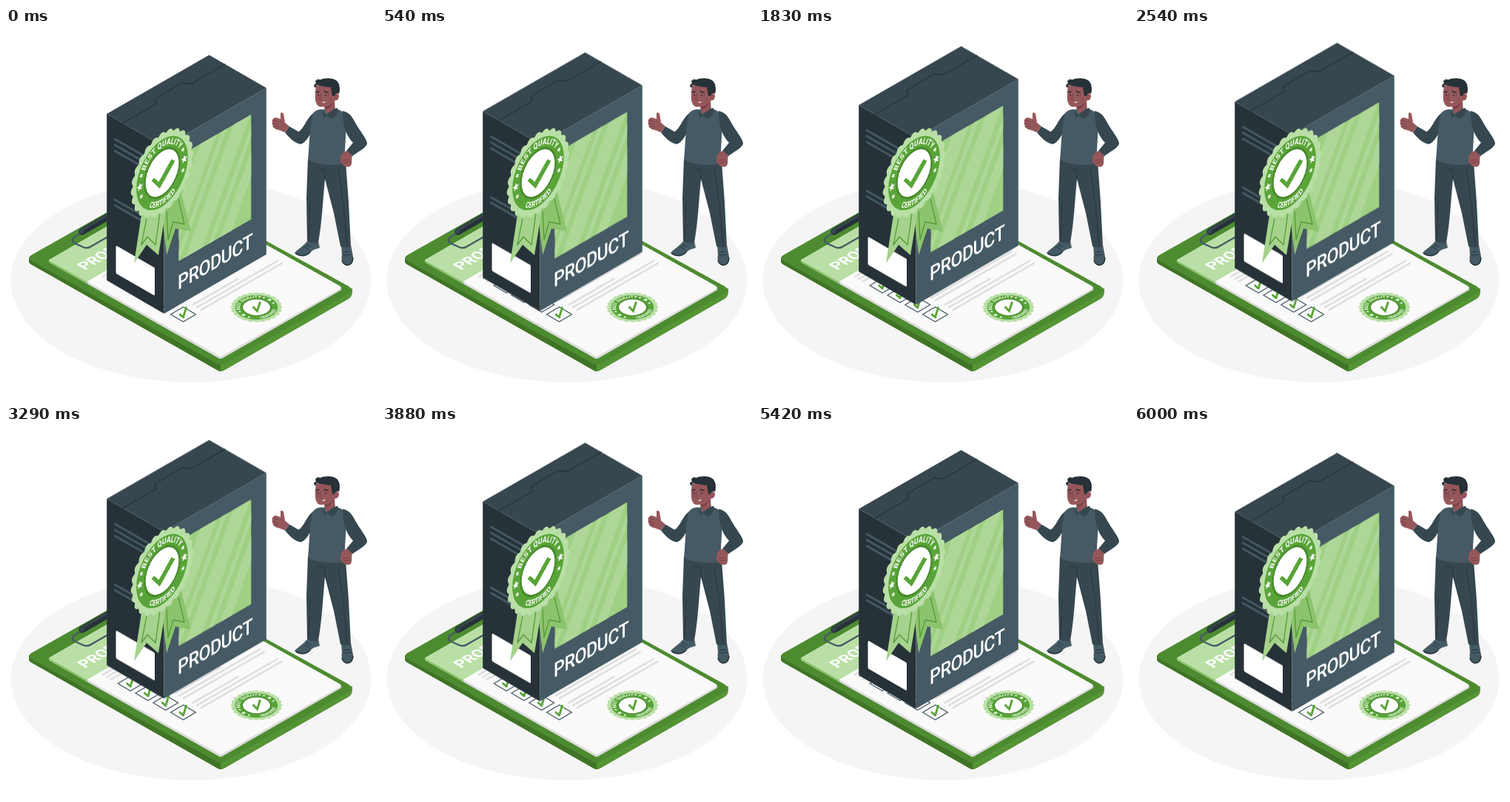
Recreate the animation shown at these times as an HTML page. Size 500 by 500 pixels, loop 6040 ms.

```html
<!DOCTYPE html>
<html lang="en">
<head>
<meta charset="utf-8">
<title>Certified product</title>
<style>
  html, body { margin: 0; width: 100%; height: 100%; overflow: hidden; background: #fff; }
  svg { display: block; width: 100vw; height: 100vh; }
  text { fill: #fff; font-family: Roboto, Inter, sans-serif; }
  .line { fill: none; stroke-linecap: round; stroke-linejoin: round; }
  .tick { fill: none; stroke: #59a438; }
  .skin { fill: #96575b; }
  .dark { fill: #37474f; }
  .slate { fill: #455a64; }
  .ink { fill: #263238; }
</style>
</head>
<body>
<svg viewBox="0 0 500 500">
  <defs>
    <path id="arcTop" d="M-31.5 0A31.5 31.5 0 0 1 31.5 0"/>
    <path id="arcLow" d="M-38 0A38 38 0 0 0 38 0"/>
    <path id="star" d="M0 -4L1.2 -1.5L4 -1.2L1.9 .6L2.5 3.4L0 2L-2.5 3.4L-1.9 .6L-4 -1.2L-1.2 -1.5Z" fill="#fff"/>
    <clipPath id="pane"><rect x="23" y="-200.5" width="113" height="141.5"/></clipPath>
    <g id="badge">
      <path id="scallop" fill="#b9dfa6"/>
      <circle r="40.500" fill="#59a438"/>
      <circle r="28.500" fill="#478a2c"/>
      <circle r="26" fill="#fff"/>
      <g id="stars"></g>
      <g font-weight="700" text-anchor="middle">
        <text font-size="9.8"><textPath href="#arcTop" startOffset="50%">BEST QUALITY</textPath></text>
        <text font-size="9.2"><textPath href="#arcLow" startOffset="50%">CERTIFIED</textPath></text>
      </g>
    </g>
  </defs>

  <ellipse cx="250" cy="341.500" rx="243.5" ry="137.500" fill="#f5f5f5"/>

  <!-- clipboard -->
  <path d="M31 310V315Q31 318 35 320L285 462Q290 466 296 462L463 366Q468 363 468 356V352Z" fill="#559535"/>
  <path d="M31 311V315Q31 318 35 320L285 462Q288 464 290 464V450Z" fill="#3f7426"/>
  <path d="M34 307L202 212Q208 208 214 212L463 349Q470 354 463 359L296 453Q290 457 284 453L35 315Q28 311 34 307Z" fill="#4d8b30"/>
  <path d="M58 313.500V316.500L287 446Q290 448 293 446L453 354V350.500Z" fill="#dcdcdc"/>
  <path d="M58 313.500V316.500L110 346V342Z" fill="#8cc46e"/>
  <path d="M58 313.500L221 219.500L451 348.500Q454 350.500 451 352.500L292 443Q290 444.500 288 443Z" fill="#fafafa"/>
  <path d="M58 313.500L221 219.500L273 248.500L110 342.500Z" fill="#b9dfa6"/>
  <text transform="matrix(.866 -.5 .866 .5 107 327.500)" font-size="20.500" font-weight="700">PRODUCT</text>
  <g class="line">
    <path d="M102 277L92 283Q87 287 93 291L104 296Q110 299 117 294L150 275" stroke="#455a64" stroke-width="2.200"/>
    <path d="M103 275L150 248" stroke="#263238" stroke-width="9.500"/>
    <path d="M104 272L150 245.500" stroke="#37474f" stroke-width="3"/>
    <circle cx="102.500" cy="275" r="3" class="dark"/>
  </g>
  <g id="rows" class="line"></g>
  <use href="#badge" transform="matrix(.502 -.29 .502 .29 338.500 377.500)"/>
  <path class="tick" d="M333.500 376.500L339.500 382.500L343.500 370" stroke-width="3"/>

  <!-- man -->
  <g>
    <path class="slate" d="M408 287C402 295 394 299 391 303C390 307 398 309 404 308C410 306 413 300 418 299L424 297L422 288Z"/>
    <path class="slate" d="M453 293L454 306C452 313 456 320 461 321C467 321 470 316 469 309L466 293Z"/>
    <path class="line" d="M391 304C397 309 405 309 411 303M454 314C457 323 468 323 469 311" stroke="#263238" stroke-width="1.400"/>
    <path class="line" d="M403 296l6 3M406 293l6 3M456 303l9-1M456 307l10-1" stroke="#263238" stroke-width=".8"/>
    <path class="dark" d="M408 176L406 230L407 288Q414 292 422 290C427 263 428 235 431 204L443 250L452 295Q459 298 466 295L463 235L459 181Z"/>
    <path class="line" d="M431 205L430 191M420 188Q425 191 430 191M411 232L409 286M449 190L456 240L461 293" stroke="#263238" stroke-width=".8"/>
    <path class="dark" d="M424 112C412 113 408 124 402 133C399 137 397 140 395 140L383 133L377 141C383 149 391 156 398 157C404 156 409 147 414 139Z"/>
    <path class="skin" d="M371 115C373 113 376 116 375.500 119L377 128L383 133L377 141L369 138C363 137 360 134 360 129C359 124 361 121 365 121L371 123Z"/>
    <path class="line" d="M361 125l7 1M360 129l8 1M362 133l6 1" stroke="#703d42" stroke-width=".8"/>
    <path class="slate" d="M424 110L448 110C456 112 459 116 460 130L457 183C443 187 420 185 408 178C410 160 410 135 414 118C416 112 420 111 424 110Z"/>
    <path class="dark" d="M455 112C464 114 468 120 472 128C478 139 488 150 488 156C487 162 476 167 468 173L460 166L469 155C462 147 455 137 455 112Z"/>
    <path class="skin" d="M461 166L468 173C466 178 469 183 465 187C460 189 454 186 452 180C451 174 454 167 461 166Z"/>
    <path class="line" d="M455 179l8-1M456 183l8-2" stroke="#703d42" stroke-width=".8"/>
    <path class="skin" d="M430 99L444 96L445 114L433 119Z"/>
    <path d="M430 106Q438 106 442 100Q440 109 431 111Z" fill="#7c464b"/>
    <path class="dark" d="M427 112L432 117L444 109L448 108C450 113 446 119 441 123L434 118L430 122Z"/>
    <path class="skin" d="M419 78C417 92 417 103 423 106C430 108 438 104 442 98Q450 99 450 92Q449 87 444 88L440 74Z"/>
    <path class="ink" d="M418 81C415 78 416 76 419 75L418 72Q420 68 425 70C430 67 446 67 449 74C452 79 451 86 450 89Q446 86 444 92L441 92L439 80C433 80 425 78 420 77Z"/>
    <path class="line" d="M419 87l4-1M430 86l5 1" stroke="#263238" stroke-width="1.300"/>
    <circle class="ink" cx="422" cy="90.500" r="1"/><circle class="ink" cx="432" cy="91" r="1"/>
    <path class="line" d="M426 89L423.500 96L426 97" stroke="#703d42" stroke-width=".9"/>
    <path d="M427 100Q430 100.500 432 98.500Q430 103 427 100Z" fill="#fff"/>
  </g>

  <!-- box -->
  <g id="box">
    <path class="ink" d="M136.200 116L213.500 160.500V386L136.200 341Z"/>
    <path class="slate" d="M213.500 160.500L351.800 81V306L213.500 386Z"/>
    <path class="dark" d="M274.500 36.500L351.800 81L213.500 160.500L136.200 116Z"/>
    <path class="line" d="M158 128.500L203 102.500L201 96L238 74L250 75.500L296 49" stroke="#263238" stroke-width="1.300"/>
    <path class="line" d="M147 150l60 34.500M147 158l60 34.500M147 166l60 34.500M147 232l44 25M147 239.500l44 25" stroke="#455a64" stroke-width="2.600"/>
    <path d="M150 294.500L200 323.500Q201 324 201 325.500V360Q201 362 199.500 361L150 332.500Q148.500 331.500 148.500 330V296Q148.500 294 150 294.500Z" fill="#fff"/>
    <g transform="matrix(.866 -.5 0 1 213.500 385.500)">
      <g id="glass" clip-path="url(#pane)">
        <rect x="23" y="-201" width="114" height="143" fill="#9fd084"/>
      </g>
      <text x="21.500" y="-20.500" font-size="27" font-weight="500" letter-spacing="-.7">PRODUCT</text>
    </g>
  </g>

  <!-- rosette -->
  <path d="M210 245L217 307L229 271L250 275L237 223Z" fill="#8cc46e"/>
  <path d="M184 246L173 318L190 293L206 307L216 246Z" fill="#a5d28c"/>
  <path class="line" d="M191 252L183 293L191 282L202 293L208 250M217 248L219 286L226 262L241 265L233 231" stroke="#559a36" stroke-width="1.300"/>
  <use href="#badge" transform="matrix(.86 -.54 0 1.115 211 196)"/>
  <path class="tick" d="M198.500 204.500L207 212.500L226 178.500" stroke-width="5.600"/>
</svg>
<script>
  const $ = id => document.getElementById(id);

  function add(parent, tag, attrs) {
    const el = document.createElementNS("http://www.w3.org/2000/svg", tag);
    for (const key in attrs) el.setAttribute(key, attrs[key]);
    parent.append(el);
  }

  // Scalloped rim of the rosette
  const rim = Array.from({ length: 264 }, (_, i) => {
    const a = i / 264 * Math.PI * 2;
    const r = 46 + 3.2 * Math.abs(Math.cos(12 * a));
    return `${(r * Math.cos(a)).toFixed(2)} ${(r * Math.sin(a)).toFixed(2)}`;
  });
  $("scallop").setAttribute("d", `M${rim.join("L")}Z`);

  for (const side of [0, 180])
    for (const turn of [-21, 0, 21])
      add($("stars"), "use", {
        href: "#star",
        transform: `rotate(${side + turn}) translate(35 0) rotate(${-side - turn}) scale(${turn ? 0.75 : 1.2})`
      });

  // Document rows: a tick box and three lines of text each
  const rows = $("rows");
  const rule = (x, y, w) =>
    add(rows, "path", { d: `M${x} ${y}l${w} ${-w * 0.577}`, stroke: "#e0e0e0", "stroke-width": 2.6 });
  for (let i = 0; i < 4; i++) {
    const x = 239.5 - 23.8 * i, y = 387 - 13 * i;
    add(rows, "path", { d: `M${x - 17} ${y}l17 -10l17 10l-17 10z`, stroke: "#455a64", "stroke-width": 1.4 });
    add(rows, "path", { class: "tick", d: `M${x - 4.5} ${y}l4.500 4l4 -13`, "stroke-width": 2.8 });
    rule(x + 13, y - 13, 61);
    rule(x + 18.5, y - 9.5, 109);
    rule(x + 24, y - 6, 109);
  }
  for (let i = 0; i < 3; i++) rule(131 + 5.5 * i, 336 + 3.2 * i, 90);

  // Reflections on the window: left end and width
  const shines = [[-42, 26], [-8, 8], [10, 26], [46, 8], [64, 18]];
  for (const [x, w] of shines)
    add($("glass"), "path", { d: `M${x + 23} -58h${w}l76 -144h${-w}z`, fill: "#aed797" });

  // The box rises and sinks at an even speed, 24 steps a second
  const ticks = 145, rise = 72;
  $("box").animate([
    { transform: "translateY(0px)", easing: `steps(${rise})` },
    { transform: "translateY(-19.5px)", offset: rise / ticks, easing: `steps(${ticks - rise})` },
    { transform: "translateY(0px)" }
  ], { duration: 6040, iterations: Infinity, delay: -5 });
</script>
</body>
</html>
```
